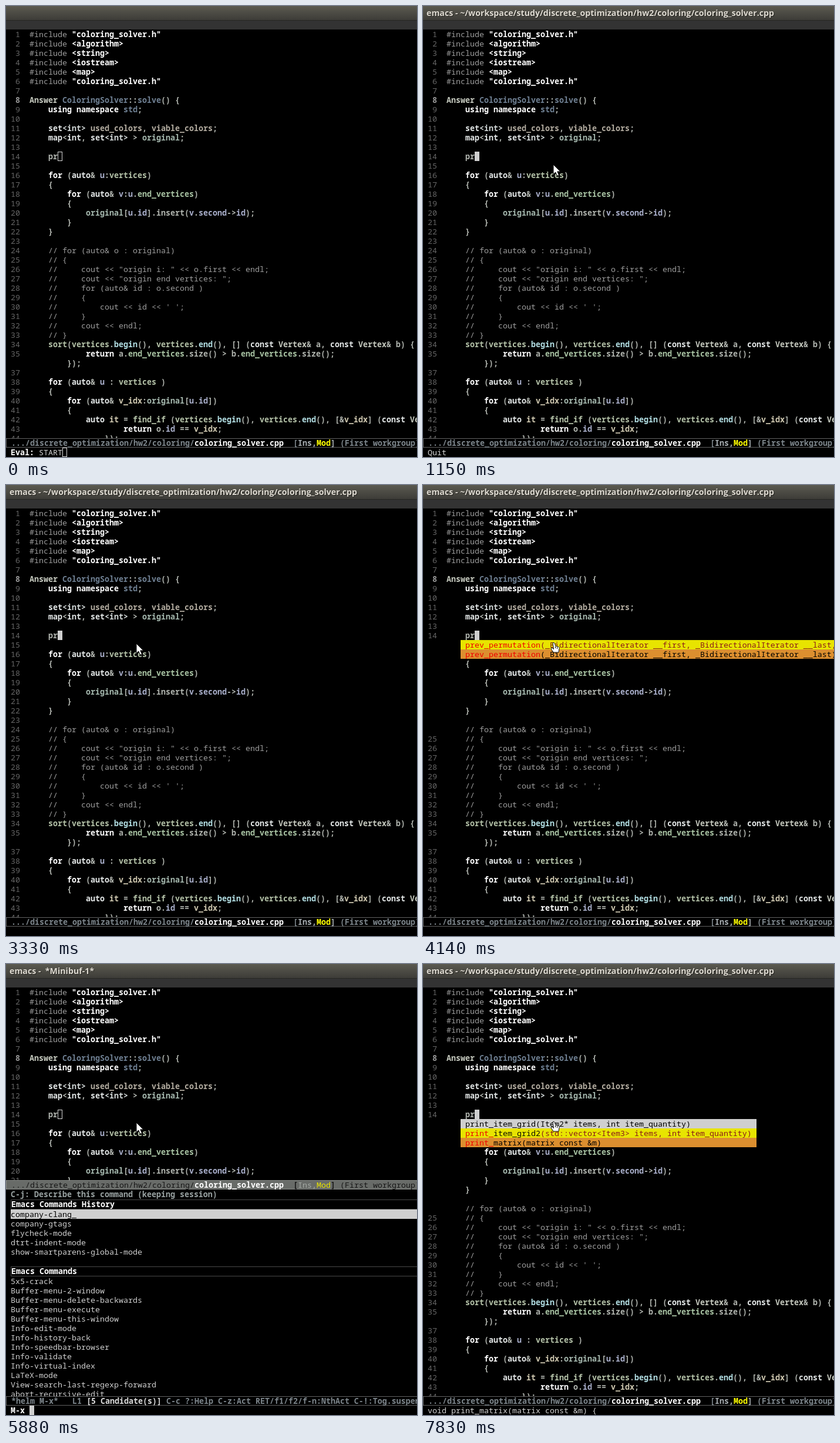
An HTML page that plays this animation: 700 px wide and 768 px high, repeating every 8000 ms.

```html
<!DOCTYPE html>
<html lang="en">
<head>
<meta charset="utf-8">
<title>Editor completion</title>
<style>
html, body { margin: 0; width: 100%; height: 100%; overflow: hidden; background: #000; }
svg { display: block; }
text { font: 13.333px "Noto Sans Mono", "DejaVu Sans Mono", monospace; white-space: pre; }
text.b { font-weight: 700; }
text.title { font: 700 14.2px "Open Sans", "Noto Sans", sans-serif; }
</style>
</head>
<body>
<svg id="stage" width="700" height="768" viewBox="0 0 700 768">
  <defs>
    <linearGradient id="bar" x2="0" y2="1">
      <stop offset="0" stop-color="#5b5a50"/>
      <stop offset="1" stop-color="#3d3c38"/>
    </linearGradient>
    <clipPath id="full"><rect y="40" width="700" height="696"/></clipPath>
    <clipPath id="half"><rect y="40" width="700" height="328"/></clipPath>
  </defs>
  <rect width="700" height="768"/>
  <rect width="700" height="24" fill="url(#bar)"/>
  <rect y="24" width="700" height="16" fill="#333"/>
  <rect y="24" width="700" height="1" fill="#262622"/>
  <g id="view"></g>
</svg>
<script>
const CELL = 8, ROW = 16, TOP = 40, LOOP = 8000;
const view = document.getElementById('view');

// A leading % stands for the two slashes of a commented-out line
const code = [
  '#include "coloring_solver.h"',
  '#include <algorithm>',
  '#include <string>',
  '#include <iostream>',
  '#include <map>',
  '#include "coloring_solver.h"',
  '',
  'Answer ColoringSolver::solve() {',
  '    using namespace std;',
  '',
  '    set<int> used_colors, viable_colors;',
  '    map<int, set<int> > original;',
  '',
  '    pr',
  '',
  '    for (auto& u:vertices)',
  '    {',
  '        for (auto& v:u.end_vertices)',
  '        {',
  '            original[u.id].insert(v.second->id);',
  '        }',
  '    }',
  '',
  '    % for (auto& o : original)',
  '    % {',
  '    %     cout << "origin i: " << o.first << endl;',
  '    %     cout << "origin end vertices: ";',
  '    %     for (auto& id : o.second )',
  '    %     {',
  '    %         cout << id << \' \';',
  '    %     }',
  '    %     cout << endl;',
  '    % }',
  '    sort(vertices.begin(), vertices.end(), [] (const Vertex& a, const Vertex& b) {',
  '            return a.end_vertices.size() > b.end_vertices.size();',
  '        });',
  '',
  '    for (auto& u : vertices )',
  '    {',
  '        for (auto& v_idx:original[u.id])',
  '        {',
  '            auto it = find_if (vertices.begin(), vertices.end(), [&v_idx] (const Vertex& o) {',
  '                    return o.id == v_idx;',
  '                });'
];

// Identifier colours, one entry per group of words
const palette = {};
for (const [color, words] of [
  ['#ffffff', 'using namespace for return'],
  ['#e4e8e8', 'auto const int set map'],
  ['#c6cabf', 'Answer Vertex'],
  ['#6f8093', 'ColoringSolver solve std'],
  ['#b3aca0', 'used_colors viable_colors'],
  ['#a5b8ae', 'original'],
  ['#b4c2a8', 'vertices sort find_if'],
  ['#a9c4a4', 'end_vertices'],
  ['#b3dfe4', 'begin end'],
  ['#aab0cc', 'id second u v'],
  ['#cfc8b0', 'v_idx it']
]) words.split(' ').forEach(w => palette[w] = color);

const esc = s => s.replace(/&/g, '&amp;').replace(/</g, '&lt;');
const rect = (x, y, w, h, fill) => `<rect x="${x}" y="${y}" width="${w}" height="${h}" fill="${fill}"/>`;
const outline = (x, y, w, h, color) =>
  `<rect x="${x + .5}" y="${y + .5}" width="${w - 1}" height="${h - 1}" fill="none" stroke="${color}"/>`;
const text = (x, y, s, fill, cls = '') => `<text x="${x}" y="${y}" fill="${fill}" class="${cls}">${esc(s)}</text>`;

// Consecutive [string, colour, class] parts on one grid line
function run(x, y, parts) {
  return parts.map(([s, color, cls]) => {
    const out = text(x, y, s, color, cls);
    x += s.length * CELL;
    return out;
  }).join('');
}

function codeLine(line, y) {
  const muted = line.includes('%');
  const include = line.startsWith('#');
  const tokens = muted ? /\S+/g : /"[^"]*"|<\w+>|#?\w+|[^\w\s]+/g;
  return [...line.replace('% ', '\x2f\x2f ').matchAll(tokens)].map(({ 0: word, index }) => {
    const light = muted || word === '#include';
    const literal = /^["<]\w/.test(word);
    const color = light ? '#9c9c9c' : literal ? (include ? '#fff' : '#d2d8d8') : palette[word] || '#b0b4ae';
    return text(TOP + index * CELL, y, word, color, light ? '' : 'b');
  }).join('');
}

const codeText = code.map((line, i) => codeLine(line, TOP + 13 + i * ROW)).join('');

function gutter(popup) {
  return code.map((_, i) => {
    const n = i + 1;
    if (n === 36 || (popup && n > 14 && n < 25)) return '';
    return text(8, TOP + 13 + i * ROW, String(n).padStart(2), n === 8 ? '#959595' : '#656565', n === 8 ? 'b' : '');
  }).join('');
}

const block = (x, y, kind) => kind === 'solid' ? rect(x, y, CELL, ROW, '#cfcfcf')
  : kind === 'hollow' ? outline(x, y, CELL, ROW, '#d8d8d8') : '';

function fileLine(y, active) {
  const dim = active ? '#7d868c' : '#181818';
  return rect(0, y, 700, ROW, active ? '#000' : '#686b68') + outline(0, y, 702, ROW, active ? '#606060' : '#858885') +
    run(9, y + 13, [
      ['.../discrete_optimization/hw2/coloring/', dim, active ? 'b' : ''],
      ['coloring_solver.cpp', '#fff', 'b'],
      ['  [', dim, 'b'],
      ['Ins,', active ? '#a8aeb2' : '#a5aaa5', active ? 'b' : ''],
      ['Mod', active ? '#ffff00' : '#e8e400', active ? 'b' : ''],
      [']', active ? '#a8aeb2' : dim, 'b'],
      [' (First workgroup)', dim, active ? 'b' : '']
    ]);
}

const commands = ['5x5-crack', 'Buffer-menu-2-window', 'Buffer-menu-delete-backwards', 'Buffer-menu-execute',
  'Buffer-menu-this-window', 'Info-edit-mode', 'Info-history-back', 'Info-speedbar-browser', 'Info-validate',
  'Info-virtual-index', 'LaTeX-mode', 'View-search-last-regexp-forward', 'abort-recursive-edit'];

function helmPane({ recent, row, line }) {
  const items = [...recent, 'flycheck-mode', 'dtrt-indent-mode', 'show-smartparens-global-mode'];
  const heading = (y, s) => outline(8, y, 694, ROW + 1, '#484848') + text(9, y + 13, s, '#fff', 'b');
  const hints = line === 1 ? 'RET/f1/f2/f-n:NthAct C-!:Tog.suspend' : 'M-x helm-maybe-exit-minibuffer/f1/f2/f-n:NthAct';
  const list = items.map((s, i) => {
    const y = 418 + i * ROW, on = i === row;
    return (on ? rect(8, y, 692, ROW, '#cfcfcf') + rect(112, y + 14, CELL, 1, '#000') : '') +
      text(8, y + 13, s, on ? '#000' : '#cfcfcf');
  }).join('');
  return text(8, 397, 'C-j: Describe this command (keeping session)', '#99a2a2', 'b') +
    heading(401, 'Emacs Commands History') + list + heading(515, 'Emacs Commands') +
    commands.map((s, i) => text(8, 545 + i * ROW, s, '#cfcfcf')).join('') +
    rect(0, 736, 700, 32, '#000') + outline(0, 736, 702, ROW, '#606060') +
    run(9, 749, [
      ['*helm M-x*   L' + line, '#7d868c', 'b'],
      [' [5 Candidate(s)] ', '#dcdcdc', 'b'],
      ['C-c ?:Help C-z:Act ' + hints, '#7d868c', 'b']
    ]);
}

function popupMenu({ rows, common, width, selected, hover }) {
  return rows.map((s, i) => {
    const y = 264 + i * ROW, hovered = hover && i === 0, chosen = i === selected;
    const args = s.indexOf('('), plain = hovered || chosen;
    return rect(64, y, width, ROW, hovered ? '#cfcfcf' : chosen ? '#dc8f2f' : '#e8e400') +
      run(72, y + 13, [
        [s.slice(0, common), hovered ? '#000' : '#f00000'],
        [s.slice(common, args), plain ? '#000' : '#101000'],
        [s.slice(args), plain ? '#000' : '#8b1a1a']
      ]);
  }).join('');
}

const pointers = {
  arrow: '<path d="M222 270v16.5l3.8-3.5 2.7 6.2 3-1.3-2.7-6h5.2z" fill="#fff" stroke="#000"/>',
  hand: '<path d="M221 269q2-2 3.5 1l1 4 5 1.5q2 .5 1.5 3l-1 6.5h-9l-4-6q0-2 2-1.5l2.5 2z" fill="#fff" stroke="#000"/>' +
    '<path d="M225.5 275v3M228.5 276v3" stroke="#000" fill="none"/>'
};

function draw(s) {
  const { helm, popup } = s;
  view.innerHTML =
    text(7, 18, s.title, '#24231f', 'title') + text(6, 17, s.title, '#dfdbd2', 'title') +
    `<g clip-path="url(#${helm ? 'half' : 'full'})">${gutter(popup)}${codeText}${block(88, 248, s.cursor)}</g>` +
    (helm ? fileLine(368, false) + helmPane(helm) : fileLine(736, true)) +
    (popup ? popupMenu(popup) : '') +
    run(8, 765, [[s.prompt, '#fff', 'b'], [s.message, '#d4d4d4']]) +
    block(8 + (s.prompt + s.message).length * CELL, 752, s.miniCursor) +
    (pointers[s.pointer] || '');
}

const FILE = 'emacs - ~/workspace/study/discrete_optimization/hw2/coloring/coloring_solver.cpp';
const MINI = 'emacs -  *Minibuf-1*';
const permute = 'prev_permutation(_BidirectionalIterator __first, _BidirectionalIterator __last';
const permutes = [permute + ', _Compare __comp)', permute + ')'];
const prints = ['print_item_grid(Item2* items, int item_quantity)',
  'print_item_grid2(std::vector<Item3> items, int item_quantity)', 'print_matrix(matrix const &m)'];
const gtagsFirst = ['company-gtags', 'company-clang'], clangFirst = ['company-clang', 'company-gtags'];

const menu = (rows, common, width) => (selected, hover) => ({ popup: { rows, common, width, selected, hover }, pointer: 'hand' });
const permuteMenu = menu(permutes, 16, 636), printMenu = menu(prints, 6, 504);
const say = message => ({ message, prompt: '', miniCursor: '' });
const list = (recent, row, line) => ({ helm: { recent, row, line } });
const ask = { title: MINI, prompt: 'M-x ', message: '', miniCursor: 'solid', cursor: 'hollow' };
const edit = { ...say(''), helm: null, popup: null, cursor: 'solid', title: FILE, pointer: 'arrow' };
const signature = i => say('bool ' + permutes[i]);
const definition = i => say('void ' + prints[i] + ' {');

// Each step patches the state left by the step before it
const steps = [
  [0, { title: '', prompt: 'Eval: ', message: 'START', miniCursor: 'hollow', cursor: 'hollow', pointer: '', helm: null, popup: null }],
  [190, { title: MINI }],
  [250, { pointer: 'arrow' }],
  [310, { miniCursor: 'solid' }],
  [1100, edit],
  [1150, say('Quit')],
  [1860, ask],
  [1910, list(gtagsFirst, 0, 1)],
  [2630, list(gtagsFirst, 0, 2)],
  [2690, list(gtagsFirst, 1, 2)],
  [2940, say('')],
  [3280, { ...edit, cursor: 'hollow' }],
  [3330, edit],
  [4140, permuteMenu(1, false)],
  [4190, { ...permuteMenu(1, true), ...signature(1) }],
  [4470, permuteMenu(0, false)],
  [4530, { ...permuteMenu(0, true), ...signature(0) }],
  [4730, permuteMenu(1, false)],
  [4790, { ...permuteMenu(1, true), ...signature(1) }],
  [5340, edit],
  [5390, say('Quit')],
  [5820, ask],
  [5880, list(clangFirst, 0, 1)],
  [6420, list(clangFirst, 1, 2)],
  [6810, say('')],
  [6860, { ...edit, cursor: 'hollow' }],
  [6900, edit],
  [7630, { ...printMenu(1, true), ...definition(1) }],
  [7830, { ...printMenu(2, true), ...definition(2) }]
];
let state = {};
const scenes = steps.map(([at, patch]) => ({ at, state: state = { ...state, ...patch } }));

const start = performance.now();
let shown = null;
function tick() {
  const t = (performance.now() - start) % LOOP;
  const scene = scenes.findLast(s => s.at <= t);
  if (scene !== shown) draw((shown = scene).state);
  requestAnimationFrame(tick);
}
tick();
</script>
</body>
</html>
```
